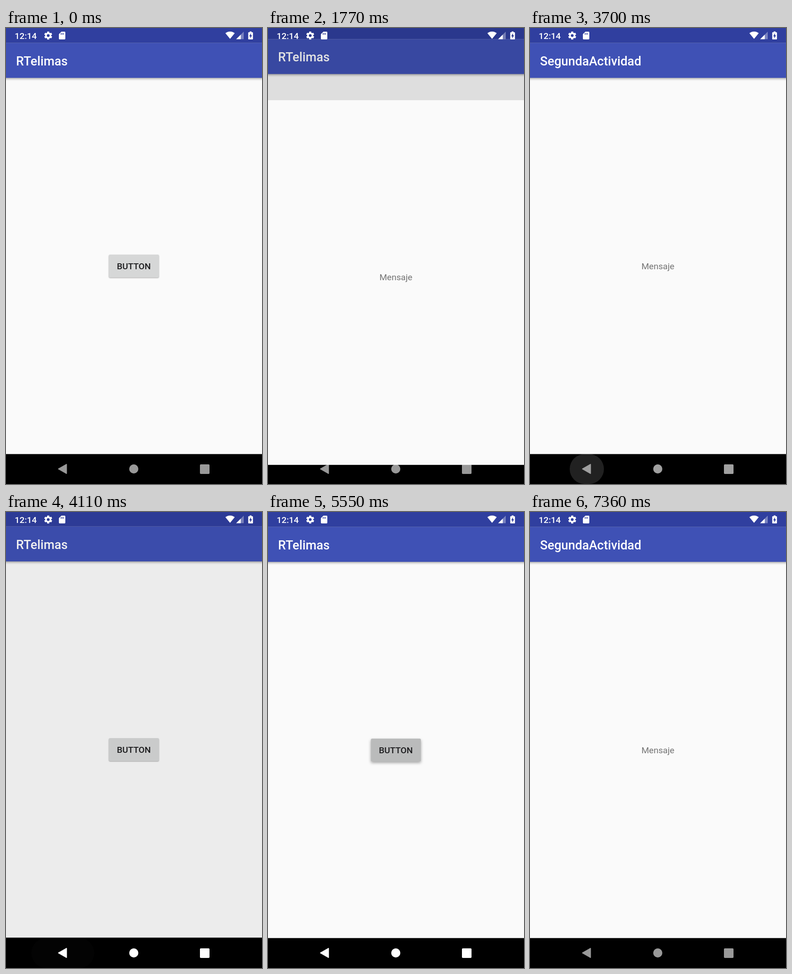
Animation, 561 px wide and 998 px high, one loop 7400 ms. Source, as an HTML page:

```html
<!DOCTYPE html>
<html lang="es">
<head>
<meta charset="utf-8">
<title>Activity transition</title>
<style>
  html, body { margin: 0; width: 100%; height: 100%; overflow: hidden; background: #000; }
  svg { display: block; width: 561px; height: 998px; font-family: Roboto, sans-serif; }
  .title { font-size: 27.3px; font-weight: 500; fill: #fff; }
  .label { font-size: 19.1px; text-anchor: middle; }
  .bar { fill: #3f51b5; filter: drop-shadow(0 2px 2.5px rgba(0, 0, 0, .36)); }
  .status { fill: #303f9f; }
  .page { fill: #fafafa; }
</style>
</head>
<body>
<svg viewBox="0 0 561 998">
  <defs>
    <clipPath id="reveal"><rect id="revealBox" width="561" height="998"/></clipPath>
    <clipPath id="buttonClip"><rect x="225.5" y="496" width="109.5" height="50" rx="2.7"/></clipPath>
    <clipPath id="fan"><path d="M491 23.7 L478 7.9 V0 H504 V7.9 Z"/></clipPath>
  </defs>
  <rect width="561" height="998"/>

  <rect id="glow" y="932.5" height="65.5" rx="32.7" fill="#fff"/>
  <g id="nav" stroke-linejoin="round" stroke-width="2">
    <path d="M115 965 L132.5 955 V975 Z" stroke="currentColor" fill="currentColor"/>
    <circle cx="280" cy="965" r="10" fill="currentColor"/>
    <rect x="425" y="955" width="21" height="21" rx="2" fill="currentColor"/>
  </g>

  <g id="first">
    <rect class="page" width="561" height="932.5"/>
    <rect class="bar" x="-8" y="32.7" width="577" height="76.4"/>
    <rect class="status" width="561" height="32.7"/>
    <text class="title" x="22" y="81.5">RTelimas</text>
    <rect id="button" x="225.5" y="496" width="109.5" height="50" rx="2.7" fill="#d6d7d7"/>
    <circle id="ripple" clip-path="url(#buttonClip)"/>
    <text class="label" x="280.2" y="528.2" font-weight="500" fill="#1c1c1e">BUTTON</text>
  </g>

  <g id="second" clip-path="url(#reveal)">
    <rect class="page" width="561" height="932.5"/>
    <rect class="bar" x="-8" y="32.7" width="577" height="76.4"/>
    <rect class="status" width="561" height="32.7"/>
    <text class="title" x="22" y="81.5">SegundaActividad</text>
    <text class="label" x="280.3" y="528.2" fill="#737373">Mensaje</text>
  </g>

  <g fill="#fff">
    <text x="19" y="23.9" font-size="19.1" font-weight="500">12:14</text>
    <g id="gear" transform="translate(92.5 16.5)">
      <circle r="4.9" fill="none" stroke="#fff" stroke-width="3.6"/>
    </g>
    <path fill-rule="evenodd" d="M121.5 8 H128.3 Q130 8 130 9.7 V23.3 Q130 25 128.3 25 H117.6 Q115.9 25 115.9 23.3 V13.5 Z
      M119.8 11.3 V14.6 H121.3 V11.3 Z M122.6 11.3 V14.6 H124.1 V11.3 Z M125.4 11.3 V14.6 H126.9 V11.3 Z"/>
    <circle cx="491" cy="24" r="16.2" clip-path="url(#fan)"/>
    <path d="M521 8 V24.6 H504.4 Z" opacity=".35"/>
    <path d="M514.5 14.5 V24.6 H504.4 Z"/>
    <path fill-rule="evenodd" d="M534 9.3 V7.6 H538 V9.3 H540 Q541.2 9.3 541.2 10.5 V23.8 Q541.2 25 540 25 H532 Q530.8 25 530.8 23.8 V10.5 Q530.8 9.3 532 9.3 Z
      M537 11.5 L532.9 18.2 H535.3 V22.8 L539.2 16 H537 Z"/>
  </g>
</svg>
<script>
const LOOP = 7400, SLIDE = 425, HEIGHT = 998;
const opens = [350, 1635, 5605], closes = [835, 3801], presses = [40, 1440, 5300];
const BACK = 3700;
const el = id => document.getElementById(id);
const set = (node, attrs) => { for (const k in attrs) node.setAttribute(k, attrs[k]); };
const clamp = x => Math.min(1, Math.max(0, x));
const mix = (a, b, p) => a + (b - a) * p;
const cubic = (a, b, c, d, s) => {
  const r = 1 - s;
  return r * r * r * a + 3 * r * r * s * b + 3 * r * s * s * c + s * s * s * d;
};

// Solves x(s) = x on a Bézier segment and returns y(s).
function bezier(x, xs, ys) {
  let lo = 0, hi = 1;
  for (let i = 0; i < 24; i++) {
    const mid = (lo + hi) / 2;
    if (cubic(...xs, mid) < x) lo = mid; else hi = mid;
  }
  return cubic(...ys, lo);
}
const standard = x => x <= 0 ? 0 : x >= 1 ? 1 : bezier(x, [0, .4, .2, 1], [0, 0, 1, 1]);
function extraSlow(x) {
  if (x <= 0 || x >= 1) return clamp(x);
  return x < 1 / 6
    ? bezier(x, [0, .05, .1333, 1 / 6], [0, 0, .06, .4])
    : bezier(x, [1 / 6, .2083, .25, 1], [.4, .82, 1, 1]);
}

for (let i = 0; i < 6; i++) {
  const tooth = document.createElementNS('http://www.w3.org/2000/svg', 'rect');
  set(tooth, { x: -2.3, y: -8.8, width: 4.6, height: 4, rx: .6, transform: `rotate(${i * 60})` });
  el('gear').append(tooth);
}

const last = (list, t) => Math.max(-1e4, ...list.filter(s => s <= t));

function drawWindows(t) {
  const opened = last(opens, t), closed = last(closes, t);
  const opening = opened > closed;
  const age = t - Math.max(opened, closed), x = clamp(age / SLIDE);
  const slide = opening ? standard(x) : 1 - standard(x);
  const shown = opening ? extraSlow(x) : 1 - extraSlow(x);
  const alpha = opening ? mix(1, .89, clamp(age / 117)) : mix(.9, 1, clamp((age - 208) / 217));

  set(el('first'), { transform: `translate(0 ${-.02 * HEIGHT * slide})`, opacity: alpha });
  set(el('second'), {
    transform: `translate(0 ${.041 * HEIGHT * (1 - slide)})`,
    visibility: shown > 0 ? 'visible' : 'hidden'
  });
  set(el('revealBox'), { y: .959 * HEIGHT * (1 - shown) });
}

function drawButton(t) {
  const i = presses.findLastIndex(s => s <= t);
  const age = i < 0 ? -1 : t - presses[i];
  const hold = i < 0 ? 0 : opens[i] - presses[i] - 40;
  const p = standard(age / 225);
  const fade = age < 0 ? 0 : 1 - clamp((age - hold) / 150);
  const lift = clamp(age / 100) * fade;
  set(el('ripple'), { cx: mix(264, 280, p), cy: mix(534, 521, p), r: mix(38, 61, p), opacity: .13 * fade });
  el('button').style.filter =
    `drop-shadow(0 ${mix(1.5, 3.5, lift)}px ${mix(1.3, 3, lift)}px rgba(0,0,0,.34))`;
}

function drawNav(t) {
  const age = t - BACK;
  const level = t < BACK ? 153
    : t < 6080 ? mix(160, 255, clamp(age / 200))
    : mix(255, 153, clamp((t - 6080) / 1280));
  el('nav').style.color = `rgb(${level},${level},${level})`;
  const w = mix(75, 138, standard(age / 350));
  set(el('glow'), {
    x: 124.5 - w / 2, width: w,
    opacity: age < 0 ? 0 : .13 * (1 - clamp((age - 100) / 340))
  });
}

function frame() {
  const t = performance.now() % LOOP;
  drawWindows(t);
  drawButton(t);
  drawNav(t);
  requestAnimationFrame(frame);
}
frame();
</script>
</body>
</html>
```
